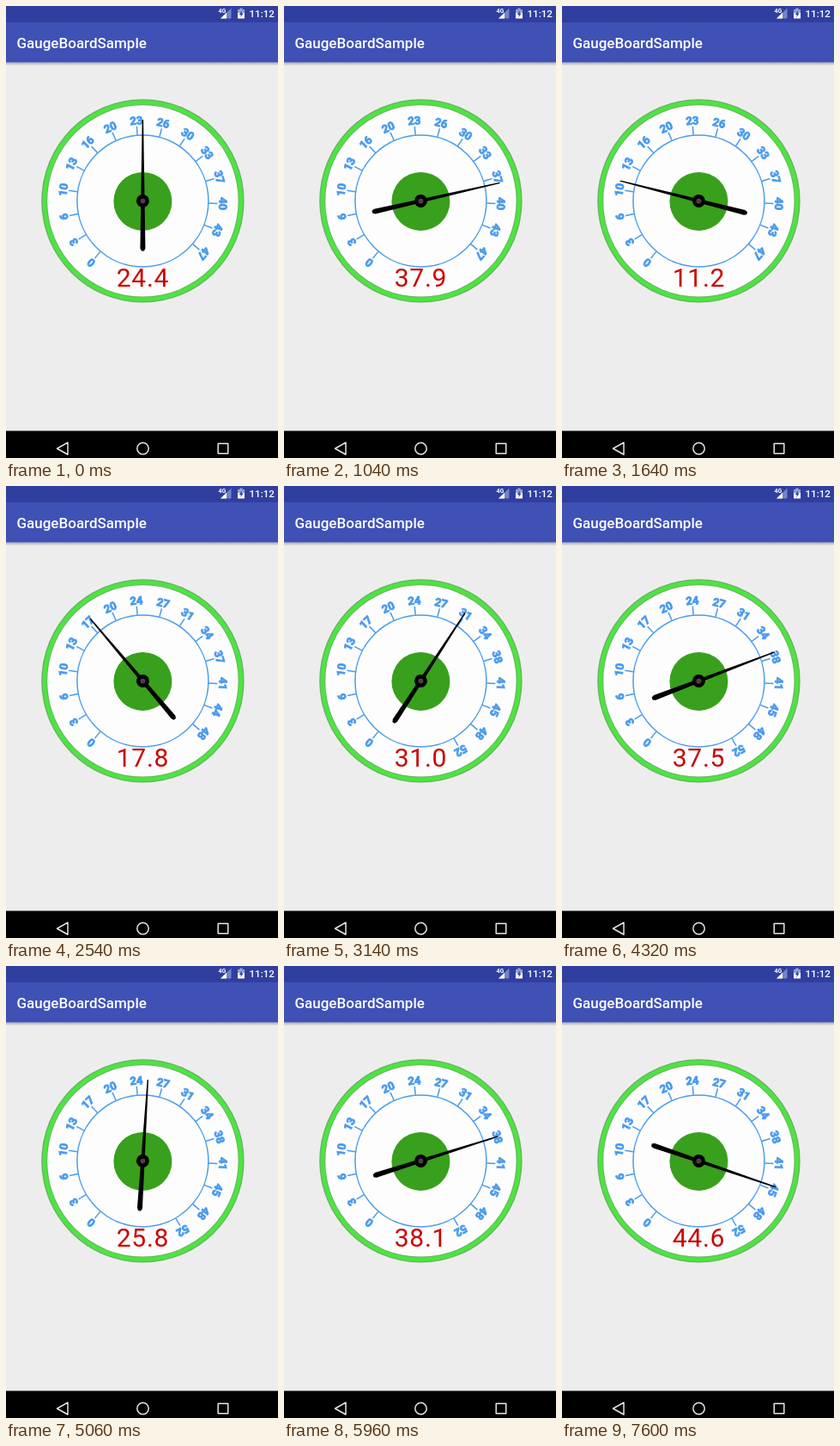
An HTML page for the animation above (7.81 s loop, 317 by 525 pixels).

```html
<!DOCTYPE html>
<html lang="en">
<head>
<meta charset="utf-8">
<title>Gauge</title>
<style>
  html, body { margin: 0; width: 100%; height: 100%; overflow: hidden; background: #ededed; }
  svg { display: block; width: 317px; height: 525px; font-family: Roboto, sans-serif; }
  .label { font-size: 13px; font-weight: 700; fill: #4a9bee; stroke: #4a9bee; stroke-width: .9; text-anchor: middle; }
  .tick { stroke: #4a9bee; stroke-width: 1.5; }
</style>
</head>
<body>
<svg viewBox="0 0 317 525">
  <defs>
    <linearGradient id="shade" x2="0" y2="1">
      <stop stop-color="#000" stop-opacity=".28"/>
      <stop offset="1" stop-color="#000" stop-opacity="0"/>
    </linearGradient>
  </defs>
  <rect width="317" height="525" fill="#ededed"/>
  <rect y="65.5" width="317" height="4" fill="url(#shade)"/>
  <rect y="19" width="317" height="46.5" fill="#3f51b5"/>
  <rect width="317" height="19" fill="#303f9f"/>

  <g fill="#fff">
    <text x="12.5" y="49" font-size="17" font-weight="500">GaugeBoardSample</text>
    <text x="283.5" y="13" font-size="11.6" font-weight="500">11:12</text>
    <text x="247.5" y="8" font-size="7" font-weight="700">4G</text>
    <path d="M250 14.5L262.5 2.5V14.5Z" opacity=".35"/>
    <path d="M250 14.5L257 7.8V14.5Z"/>
    <path d="M270 8V4h2.3V2.5h3.4V4h2.3v4Z" opacity=".5"/>
    <path d="M270 8h8v6.5h-8Z"/>
    <path d="M274.7 5.5l-3 4.5h1.900v3l3-4.5h-1.900Z" fill="#303f9f"/>
  </g>

  <rect y="493.5" width="317" height="31.5" fill="#000"/>
  <g fill="none" stroke="#e6e6e6" stroke-width="1.5" stroke-linejoin="round">
    <path d="M59.5 514L72 507V521Z"/>
    <circle cx="159.5" cy="514" r="6.700"/>
    <rect x="247.2" y="508.2" width="11.6" height="11.6"/>
  </g>

  <g transform="translate(159.4 226.4)">
    <circle r="118.2" fill="#6fae69"/>
    <circle r="116.900" fill="#4be53f"/>
    <circle r="112.200" fill="#6fae69"/>
    <circle r="111.200" fill="#fdfdfd"/>
    <circle r="34" cy=".5" fill="#38a01c"/>
    <circle r="76.500" fill="none" stroke="#4a9bee" stroke-width="1.500"/>
    <g id="scale"></g>
    <text id="value" y="99.800" font-size="30" letter-spacing=".700" fill="#c00" text-anchor="middle"></text>
    <path id="needle" d="M-.7 -94.500H.7L3 55L1.500 58H-1.500L-3 55Z"/>
    <circle r="7.500"/>
    <circle r="3" fill="#4a4040"/>
  </g>
</svg>
<script>
  const LOOP = 7810, STEP = 149.1, LEAD = 10;
  const START = -140, SWEEP = 290, PARTS = 15, FULL = 52;

  // Turning points of the reading: [step, value]
  const keys = [
    [0, 24.4], [4, 40.1], [6, 40.1], [11, 11.2], [13, 3.1], [17, 17.8], [25, 40.4], [27, 42],
    [33, 24.7], [34, 25.75], [36, 40.5], [38, 36.8], [40, 38.1], [41, 45], [46, 45], [48, 42.1], [51, 44.6]
  ];

  const byId = id => document.getElementById(id);
  const scale = byId("scale"), value = byId("value"), needle = byId("needle");

  function add(parent, tag, attrs) {
    const el = document.createElementNS("http://www.w3.org/2000/svg", tag);
    for (const key in attrs) el.setAttribute(key, attrs[key]);
    return parent.appendChild(el);
  }

  const marks = Array.from({ length: PARTS + 1 }, (_, i) => {
    const g = add(scale, "g", { transform: `rotate(${START + i * SWEEP / PARTS})` });
    add(g, "path", { class: "tick", d: "M0 -77V-87" });
    return { g, label: add(g, "text", { class: "label", y: -89 }) };
  });

  const rise = i => keys[i] && keys[i + 1]
    ? (keys[i + 1][1] - keys[i][1]) / (keys[i + 1][0] - keys[i][0]) : 0;

  // Flat at turning points, harmonic mean of both sides elsewhere
  function slope(i) {
    const a = rise(i - 1), b = rise(i);
    return a * b > 0 ? 2 * a * b / (a + b) : 0;
  }

  function readingAt(step) {
    const i = Math.min(keys.findLastIndex(key => key[0] <= step), keys.length - 2);
    const [x0, y0] = keys[i], [x1, y1] = keys[i + 1];
    const w = x1 - x0, u = (step - x0) / w, v = 1 - u;
    return y0 + (y1 - y0) * u * u * (3 - 2 * u) + w * u * v * (slope(i) * v - slope(i + 1) * u);
  }

  // The full scale widens a little, then stays
  const maxAt = step => Math.min(FULL, 50.55 + 0.4 * Math.max(0, step - 14));

  let shown;
  function draw(t) {
    const step = Math.min(51, Math.floor((t + LEAD) / STEP));
    if (step === shown) return;
    shown = step;
    const reading = readingAt(step), max = maxAt(step);
    marks.forEach(({ g, label }, i) => {
      g.style.display = i === PARTS && max < FULL ? "none" : "";
      label.textContent = Math.floor(i * max / PARTS + 1e-6);
    });
    value.textContent = reading.toFixed(1);
    needle.setAttribute("transform", `rotate(${START + SWEEP * reading / max})`);
  }

  const begin = performance.now();
  function frame() {
    draw((performance.now() - begin) % LOOP);
    requestAnimationFrame(frame);
  }
  frame();
</script>
</body>
</html>
```
